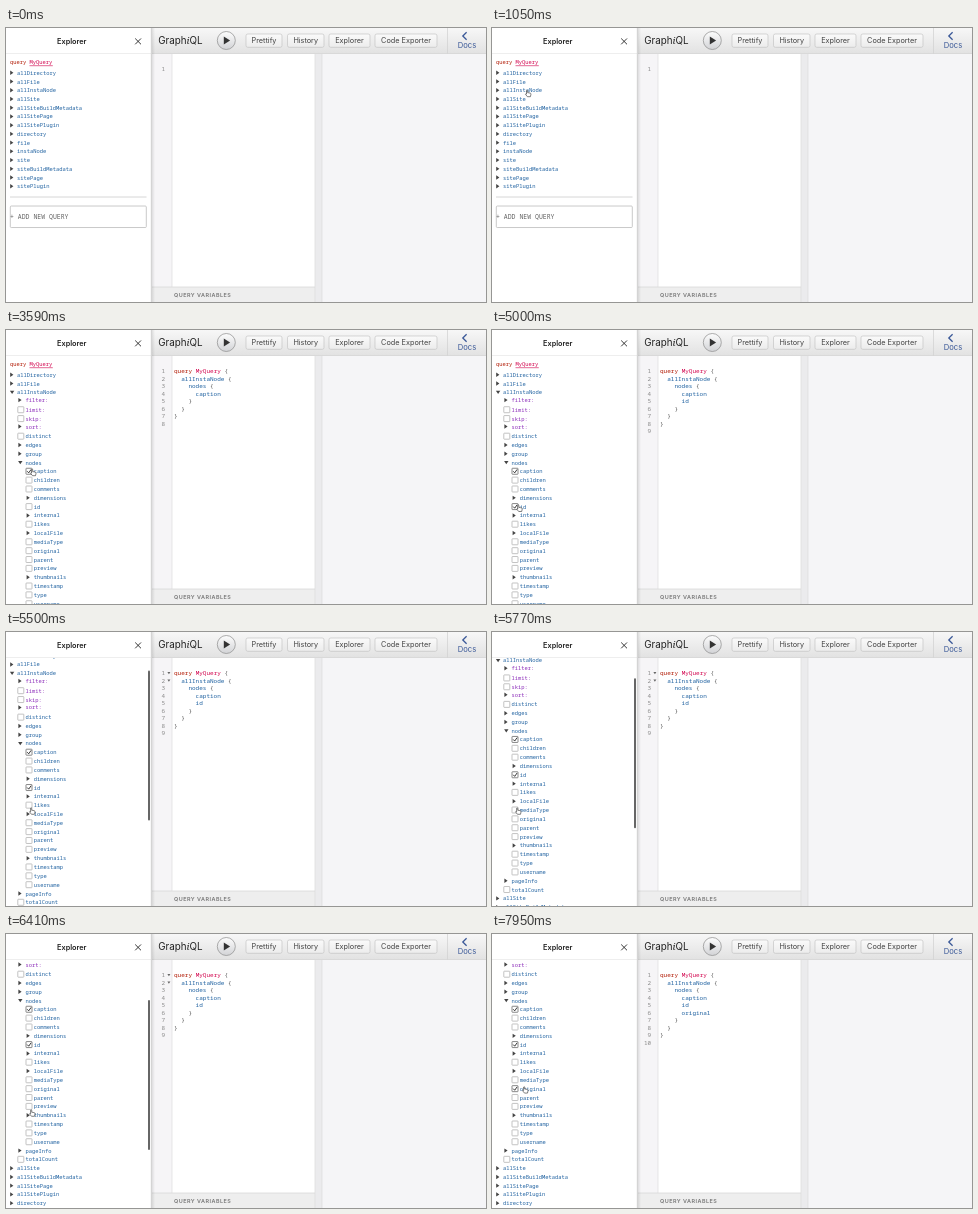
Animation of 480x274 px, one loop 8000 ms. Source, as an HTML page:

```html
<!DOCTYPE html>
<html lang="en">
<head>
<meta charset="utf-8">
<title>Query explorer</title>
<style>
html, body { margin: 0; width: 100%; height: 100%; overflow: hidden; background: #fff; }
svg { display: block; width: 100vw; height: 100vh; }
text { white-space: pre; }
.ui { font-family: Inter, Roboto, sans-serif; }
.mono { font-family: "Noto Sans Mono", "DejaVu Sans Mono", monospace; }
.tree { font-size: 5.43px; }
.code { font-size: 6px; }
.field { fill: #1f61a0; }
.arg { fill: #8b2bb9; }
.keyword { fill: #b11a04; }
.name { fill: #d2054e; }
.punct { fill: #555; }
.num { fill: #888; text-anchor: end; }
</style>
</head>
<body>
<svg viewBox="0 0 480 274" preserveAspectRatio="none">
  <defs>
    <linearGradient id="bar" x2="0" y2="1"><stop stop-color="#f7f7f7"/><stop offset="1" stop-color="#e2e2e2"/></linearGradient>
    <linearGradient id="btn" x2="0" y2="1"><stop stop-color="#fafafa"/><stop offset="1" stop-color="#ececec"/></linearGradient>
    <linearGradient id="run" x2="0" y2="1"><stop stop-color="#fdfdfd"/><stop offset="1" stop-color="#d2d3d6"/></linearGradient>
    <linearGradient id="edge"><stop stop-color="#000" stop-opacity=".13"/><stop offset="1" stop-color="#000" stop-opacity="0"/></linearGradient>
    <clipPath id="view"><path d="M0 26H145V274H0z"/></clipPath>
  </defs>

  <path fill="#fff" d="M0 0H480V274H0z"/>
  <g clip-path="url(#view)"><g id="tree" class="mono tree"></g></g>
  <path stroke="#e2e2e2" stroke-width=".6" d="M0 25.5H145"/>
  <rect id="thumb" x="142" width="2" height="150" rx="1" fill="#666"/>
  <text class="ui" x="65.8" y="16.2" font-size="7.3" font-weight="600" fill="#222" text-anchor="middle">Explorer</text>
  <path stroke="#222" stroke-width=".9" d="M129.2 10.5l5.8 5.8m0-5.8l-5.8 5.8"/>

  <path fill="#f6f5f7" d="M146 26H166V259H146z"/>
  <path stroke="#ddd" stroke-width=".7" d="M166 26V259"/>
  <g id="code" class="mono code"></g>
  <path fill="#eee" d="M146 259H309V274H146z"/>
  <path stroke="#d4d4d4" stroke-width=".7" d="M146 259H309"/>
  <text class="ui" x="168" y="269.2" font-size="5.45" font-weight="600" letter-spacing=".48" fill="#777">QUERY VARIABLES</text>
  <path fill="#f5f5f7" d="M316 26H480V274H316z"/>
  <path fill="#ebebed" d="M309 26H316V274H309z"/>
  <path stroke="#dcdcdc" stroke-width=".7" d="M309 26V274M316 26V274"/>

  <path fill="url(#bar)" d="M146 0H480V25.5H146z"/>
  <path stroke="#d0d0d0" stroke-width=".7" d="M146 25.5H480M441.5 0V25.5"/>
  <text class="ui" x="152.2" y="16.3" font-size="9.8" fill="#222">Graph<tspan font-family="'Noto Serif', serif" font-style="italic">i</tspan>QL</text>
  <circle cx="220.3" cy="12.5" r="9" fill="url(#run)" stroke="#8c8c8c" stroke-width=".7"/>
  <path fill="#333" d="M217.8 8.5L224.1 12.5L217.8 16.5z"/>
  <g id="buttons" class="ui"></g>
  <path fill="none" stroke="#3b5998" stroke-width="1.3" d="M460.6 4.2L456.8 8L460.6 11.8"/>
  <text class="ui" x="461" y="20.3" font-size="7.6" fill="#3b5998" text-anchor="middle">Docs</text>
  <path fill="url(#edge)" d="M145 0H149V274H145z"/>
  <path stroke="#c9c9c9" stroke-width=".7" d="M145.3 0V274"/>

  <path id="hand" fill="#fff" stroke="#222" stroke-width=".65" stroke-linejoin="round"
    d="M.7 .7Q1.4 -.2 2 .7V3L3.5 3.2L5 3.6Q5.9 3.9 5.7 5L5.1 7.6H1.7L-.5 4.9Q-.5 4 .7 4.6z"/>
</svg>
<script>
const LOOP = 8000;
const OPEN_ROOT = 1620, OPEN_NODES = 2350, PICK_CAPTION = 3500, PICK_ID = 4700, PICK_ORIGINAL = 7600;
const EDITS = [0, OPEN_ROOT, OPEN_NODES, PICK_CAPTION, PICK_ID, PICK_ORIGINAL];
const LINT_DELAY = 500, FOLD_DELAY = 600;

// Prefix: > expandable, [ checkbox, + expanded on click
const ROOT = '>allDirectory >allFile +allInstaNode >allSite >allSiteBuildMetadata >allSitePage >allSitePlugin >directory >file >instaNode >site >siteBuildMetadata >sitePage >sitePlugin'.split(' ');
const INSTA = '>filter: [limit: [skip: >sort: [distinct >edges >group +nodes >pageInfo [totalCount'.split(' ');
const NODE = '[caption [children [comments >dimensions [id >internal [likes >localFile [mediaType [original [parent [preview >thumbnails [timestamp [type [username'.split(' ');
const PICKS = { caption: PICK_CAPTION, id: PICK_ID, original: PICK_ORIGINAL };

const SCROLL = [[5100, 0], [5500, 21], [6050, 47], [6410, 66]];
const POINTER = [[300, 150, 146], [950, 34, 62], [1750, 32, 62], [2130, 28.4, 130.4], [2600, 28.4, 130.4],
  [3250, 25, 139], [3900, 25, 139], [4500, 25.2, 174.8], [5050, 25.2, 174.8], [5200, 24, 175.6],
  [6650, 24, 175.6], [7350, 31, 152.4]];

const $ = id => document.getElementById(id);
const text = (x, y, cls, s) => `<text x="${x}" y="${y}" class="${cls}">${s}</text>`;
const linear = p => p;
const smooth = p => p * p * (3 - 2 * p);

function at(keys, t, col, ease) {
  if (t <= keys[0][0]) return keys[0][col];
  for (let i = 1; i < keys.length; i++) {
    const a = keys[i - 1], b = keys[i];
    if (t < b[0]) return a[col] + (b[col] - a[col]) * ease((t - a[0]) / (b[0] - a[0]));
  }
  return keys[keys.length - 1][col];
}

function arrow(x, y, open) {
  const d = open ? `M${x - .3} ${y - 1.4}h4.4l-2.2 3.2z` : `M${x} ${y - 2.2}l3.2 2.2l-3.2 2.2z`;
  return `<path fill="#444" d="${d}"/>`;
}

function checkbox(x, y, on) {
  const tick = on ? `<path fill="none" stroke="#222" stroke-width=".9" d="M${x + 1.2} ${y}l1.5 1.6l2.4 -3.4"/>` : '';
  return `<rect x="${x}" y="${y - 3}" width="6" height="6" rx=".5" fill="#fff" stroke="${on ? '#555' : '#aaa'}" stroke-width=".7"/>${tick}`;
}

function drawTree(t) {
  let y = 44.8;
  let out = text(4, 36, 'keyword', 'query') + text(23.6, 36, 'name', 'MyQuery') +
    '<path stroke="#d2054e" stroke-width=".6" d="M23.5 37.7H46.8"/>';
  const list = (items, depth) => {
    for (const item of items) {
      const kind = item[0], label = item.slice(1), x = 4 + depth * 8.2;
      const open = kind === '+' && t >= (depth ? OPEN_NODES : OPEN_ROOT);
      const isArg = label.endsWith(':');
      const rowY = isArg && kind === '>' ? y - .9 : y;
      out += kind === '[' ? checkbox(x - .4, rowY, t >= PICKS[label]) : arrow(x + .2, rowY, open);
      out += text(11 + depth * 8.4, rowY + 2, isArg ? 'arg' : 'field', label);
      y += kind === '[' ? 8.87 : 8.73;
      if (open) list(depth ? NODE : INSTA, depth + 1);
    }
  };
  list(ROOT, 0);
  out += `<path stroke="#ccc" stroke-width=".8" d="M4 ${y + 2}H140.5"/>` +
    `<rect x="4.3" y="${y + 11}" width="136" height="21.5" rx="1" fill="#fff" stroke="#bbb" stroke-width=".8"/>` +
    `<text x="4" y="${y + 24.3}" font-size="6.5" fill="#666">+ ADD NEW QUERY</text>`;
  $('tree').innerHTML = out;
}

function queryLines(t) {
  if (t < OPEN_ROOT) return [''];
  const picked = Object.keys(PICKS).filter(k => t >= PICKS[k]);
  let body = ['allInstaNode'];
  const wrap = (head, inner) => [head + ' {', ...inner.map(s => '  ' + s), '}'];
  if (t >= OPEN_NODES) body = wrap('allInstaNode', picked.length ? wrap('nodes', picked) : ['nodes']);
  return [...wrap('query MyQuery', body), ''];
}

function drawCode(t, lint, fold) {
  let folds = 0;
  $('code').innerHTML = queryLines(t).map((line, i) => {
    const y = 43 + i * 7.5;
    const word = line.trim(), x = 168 + (line.length - word.length) * 3.6;
    let out = text(159.2, y, 'num', i + 1);
    const html = word
      .replace(/[{}]/g, '<tspan class="punct">$&</tspan>')
      .replace('query MyQuery', '<tspan class="keyword">query</tspan> <tspan class="name">MyQuery</tspan>');
    if (word) out += text(x, y, 'field', html);
    if (fold && word.endsWith('{') && folds++ < 2) out += `<path fill="#666" d="M161.4 ${y - 3}h3l-1.5 2.2z"/>`;
    if (lint && t < PICK_CAPTION && (word === 'allInstaNode' || word === 'nodes'))
      out += `<path stroke="#d33" stroke-width=".8" d="M${x} ${y + 1.6}h${word.length * 3.6}"/>`;
    return out;
  }).join('');
}

$('buttons').innerHTML = [['Prettify', 240, 36], ['History', 281.5, 36.5], ['Explorer', 323, 41], ['Code Exporter', 369, 62]]
  .map(([s, x, w]) => `<rect x="${x}" y="6" width="${w}" height="13.3" rx="1.8" fill="url(#btn)" stroke="#c4c4c4" stroke-width=".7"/>` +
    `<text x="${x + w / 2}" y="15.2" font-size="7.3" fill="#444" text-anchor="middle">${s}</text>`).join('');

let shown = '';
function draw(t) {
  const step = EDITS.filter(e => t >= e).length;
  const age = t - EDITS[step - 1];
  const lint = age >= LINT_DELAY, fold = age >= FOLD_DELAY;
  const key = [step, lint, fold].join();
  if (key !== shown) {
    shown = key;
    drawTree(t);
    drawCode(t, lint, fold);
  }
  const scroll = at(SCROLL, t, 1, linear);
  $('tree').setAttribute('transform', `translate(0 ${-scroll})`);
  $('thumb').setAttribute('y', 25.5 + scroll * .615);
  $('thumb').setAttribute('opacity', t < 5100 ? 0 : Math.max(0, Math.min(1, (7100 - t) / 200)));
  $('hand').setAttribute('transform', `translate(${at(POINTER, t, 1, smooth)} ${at(POINTER, t, 2, smooth)}) scale(.88)`);
  $('hand').setAttribute('opacity', t < 300 ? 0 : 1);
}

const start = performance.now();
function tick() {
  draw((performance.now() - start) % LOOP);
  requestAnimationFrame(tick);
}
tick();
</script>
</body>
</html>
```
